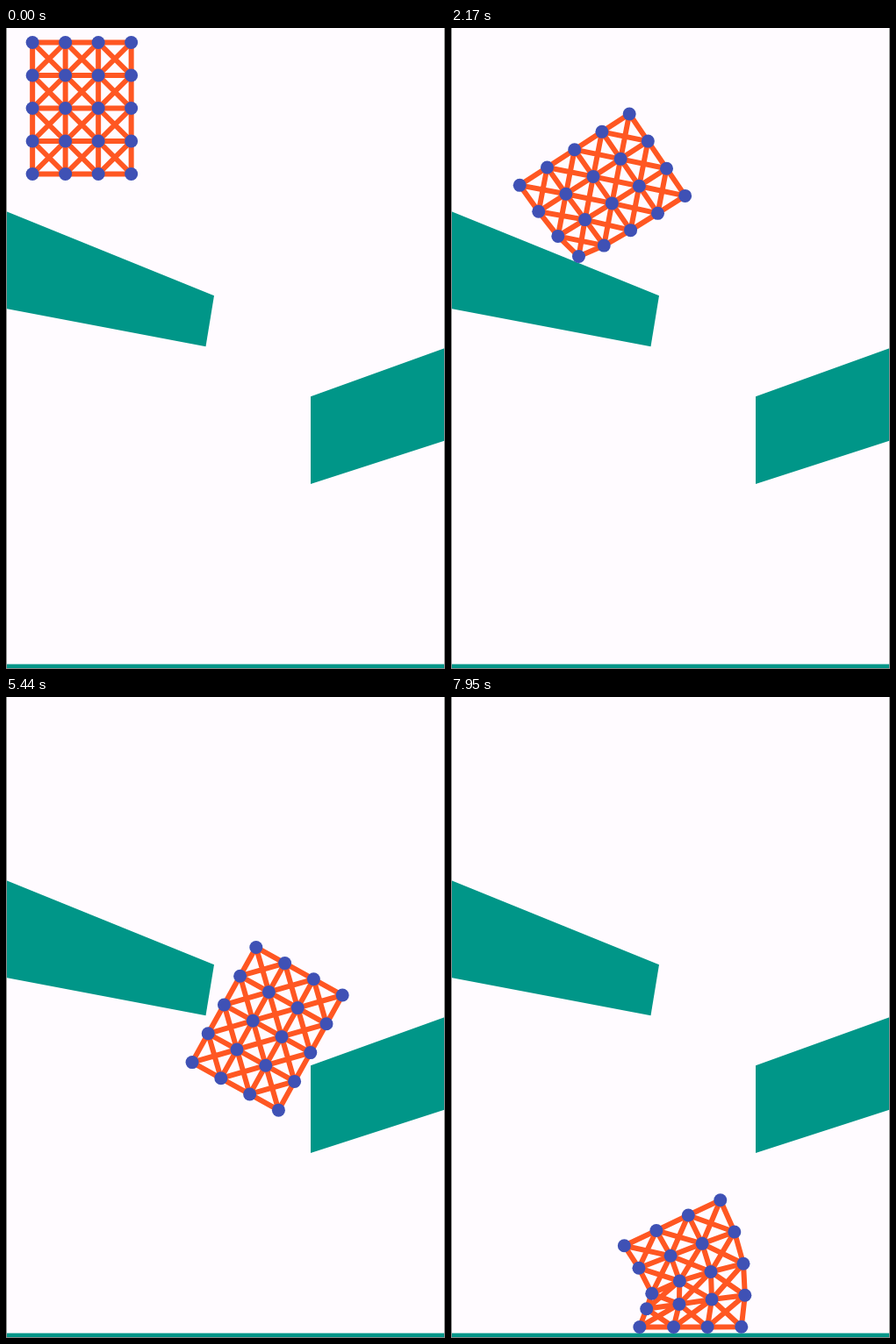
An HTML page with a canvas for the animation above (8000 ms loop, 500 by 731 pixels).

```html
<!DOCTYPE html>
<html lang="en">
<head>
<meta charset="utf-8">
<title>Soft lattice tumbling between ledges</title>
<style>
  html, body { margin: 0; width: 100%; height: 100%; overflow: hidden; background: #fffbff; }
  canvas { display: block; }
</style>
</head>
<body>
<canvas id="stage" width="500" height="731"></canvas>
<script>
const LOOP = 8000, ROWS = 5, COLS = 4, GAP = 37.5, CONTACT = 6.9;
const ctx = document.getElementById('stage').getContext('2d');

// Solid obstacles, corners in clockwise order
const solids = [
  [[0, 209], [237, 305.3], [227.5, 363.3], [0, 320]],
  [[347, 420.2], [500, 365], [500, 470.5], [347, 520]],
  [[0, 725.5], [500, 725.5], [500, 780], [0, 780]]
];

const mix = (a, b, u) => a + (b - a) * u;
const mixPoint = (p, q, u) => [mix(p[0], q[0], u), mix(p[1], q[1], u)];
const grid = place => Array.from({ length: ROWS * COLS }, (_, n) => place(n / COLS | 0, n % COLS));
const rest = grid((r, c) => [(c - 1.5) * GAP, (r - 2) * GAP]);

// Sheet stretched between four corners, bowed along its length, with one fading dent
function squash([topLeft, topRight, bottomLeft, bottomRight], bow, dent) {
  return grid((r, c) => {
    const left = mixPoint(topLeft, bottomLeft, r / 4);
    const right = mixPoint(topRight, bottomRight, r / 4);
    const arch = Math.sin(Math.PI * r / 4);
    const fade = Math.exp(-Math.hypot(r - dent.row, c - dent.col));
    return mixPoint(left, right, c / 3)
      .map((v, k) => v + bow[k] * arch + dent.by[k] * fade);
  });
}

const touchdown = squash([[30.5, 87], [143.5, 87.5], [30, 237.5], [142.5, 239.7]],
  [1.5, 0], { row: 4, col: 0, by: [0, -24] });
const cornerRoll = squash([[203, 98], [266.5, 191.5], [78, 180], [141.5, 273]],
  [0, 0], { row: 4, col: 3, by: [4, -12.5] });
const overEdge = squash([[365.5, 313], [266.5, 371], [281, 181], [183.5, 250]],
  [0, 0], { row: 2, col: 3, by: [5.5, -15] });
const crushed = squash([[311, 476.5], [239, 382], [433, 370], [400, 318]],
  [-13, -11], { row: 4, col: 1, by: [-9.5, 35] });
const slipping = squash([[323, 526], [212, 512.5], [346, 381], [239, 355.5]],
  [-3.5, 0], { row: 2, col: 3, by: [0, 0] });
const buckled = squash([[330.5, 718], [213.5, 718], [306.5, 573.5], [196, 624.5]],
  [14, 0], { row: 2, col: 3, by: [10, 9] });

// Free fall, then key poses: time, centre x, centre y, degrees, squashed shape
const path = [
  ...[0, 0.3, 0.6, 0.8].map(s => [s * 1000, 86.4, 91.5 + 93 * s * s, 0]),
  [870, 86.8, 162, 0, touchdown],
  [1080, 95, 179, 6],
  [1650, 134, 168, 35],
  [2170, 172.3, 185.5, 56.5, cornerRoll],
  [2460, 196, 203, 69],
  [3350, 273.8, 275.8, 147.4, overEdge],
  [3730, 303, 314, 184],
  [4110, 331, 371, 225],
  [4610, 337.7, 389, 246, crushed],
  [5250, 308, 371.5, 221],
  [5740, 283, 400, 191],
  [6170, 278, 442.5, 188.5, slipping],
  [6550, 268, 499.5, 189],
  [7110, 265, 634, 188],
  [7370, 267, 662, 182],
  [7950, 269, 658.3, 170, buckled]
];

function segment(t) {
  let i = 0;
  while (i < path.length - 2 && t >= path[i + 1][0]) i++;
  const span = path[i + 1][0] - path[i][0];
  return { i, span, u: Math.min(1, (t - path[i][0]) / span) };
}

function slope(i, k) {
  if (i === 0 || i === path.length - 1) return 0;
  return (path[i + 1][k] - path[i - 1][k]) / (path[i + 1][0] - path[i - 1][0]);
}

// Cubic Hermite through the path
function poseAt(t) {
  const { i, span, u } = segment(t);
  const [x, y, deg] = [1, 2, 3].map(k =>
    mix(path[i][k], path[i + 1][k], u * u * (3 - 2 * u)) +
    span * u * (1 - u) * ((1 - u) * slope(i, k) - u * slope(i + 1, k)));
  const angle = deg * Math.PI / 180;
  return { x, y, cos: Math.cos(angle), sin: Math.sin(angle) };
}

const toLocal = (p, [x, y]) => [
  (x - p.x) * p.cos + (y - p.y) * p.sin,
  (y - p.y) * p.cos - (x - p.x) * p.sin
];
const toWorld = (p, [x, y]) => [p.x + x * p.cos - y * p.sin, p.y + x * p.sin + y * p.cos];

// Deformation at each key, in body coordinates
const shapes = path.map(([t, , , , points]) => {
  const pose = poseAt(t);
  return points ? points.map(p => toLocal(pose, p)) : rest;
});

// Shortest way out of any solid the node touches
function push([x, y]) {
  for (const solid of solids) {
    let best = { d: -Infinity };
    solid.forEach(([ax, ay], i) => {
      const [bx, by] = solid[(i + 1) % solid.length];
      const len = Math.hypot(bx - ax, by - ay);
      const nx = (by - ay) / len, ny = (ax - bx) / len;
      const d = (x - ax) * nx + (y - ay) * ny;
      if (d > best.d) best = { d, nx, ny };
    });
    const depth = CONTACT - best.d;
    if (depth > 0) return [best.nx * depth, best.ny * depth];
  }
  return [0, 0];
}

const links = [];
grid((r, c) => {
  const n = r * COLS + c, right = c < COLS - 1, below = r < ROWS - 1;
  if (right) links.push([n, n + 1]);
  if (below) links.push([n, n + COLS]);
  if (right && below) links.push([n, n + COLS + 1], [n + 1, n + COLS]);
});

// Push nodes out of the solids and share part of the push with their neighbours
function collide(nodes) {
  for (let pass = 0; pass < 3; pass++) {
    const pushes = nodes.map(push);
    const move = (n, m, k) => {
      nodes[n][0] += pushes[m][0] * k;
      nodes[n][1] += pushes[m][1] * k;
    };
    nodes.forEach((_, n) => move(n, n, 1));
    for (const [a, b] of links) {
      move(a, b, 0.15);
      move(b, a, 0.15);
    }
  }
  nodes.forEach(node => {
    const [dx, dy] = push(node);
    node[0] += dx;
    node[1] += dy;
  });
}

function nodesAt(t) {
  const pose = poseAt(t), { i, u } = segment(t);
  const nodes = shapes[i].map((p, n) => toWorld(pose, mixPoint(p, shapes[i + 1][n], u)));
  collide(nodes);
  return nodes;
}

function draw(t) {
  ctx.fillStyle = '#fffbff';
  ctx.fillRect(0, 0, 500, 731);

  ctx.fillStyle = '#009688';
  for (const solid of solids) {
    ctx.beginPath();
    solid.forEach(p => ctx.lineTo(...p));
    ctx.fill();
  }

  const nodes = nodesAt(t);
  ctx.strokeStyle = '#ff5722';
  ctx.lineWidth = 6;
  ctx.beginPath();
  for (const [a, b] of links) {
    ctx.moveTo(...nodes[a]);
    ctx.lineTo(...nodes[b]);
  }
  ctx.stroke();

  ctx.fillStyle = '#3f51b5';
  for (const [x, y] of nodes) {
    ctx.beginPath();
    ctx.arc(x, y, 7.5, 0, Math.PI * 2);
    ctx.fill();
  }

  ctx.fillStyle = '#8a8a8a';
  ctx.fillRect(0, 0, 1, 731);
  ctx.fillRect(499, 0, 1, 731);
  ctx.fillRect(0, 730, 500, 1);
}

const start = performance.now();
function tick() {
  draw((performance.now() - start) % LOOP);
  requestAnimationFrame(tick);
}
tick();
</script>
</body>
</html>
```
